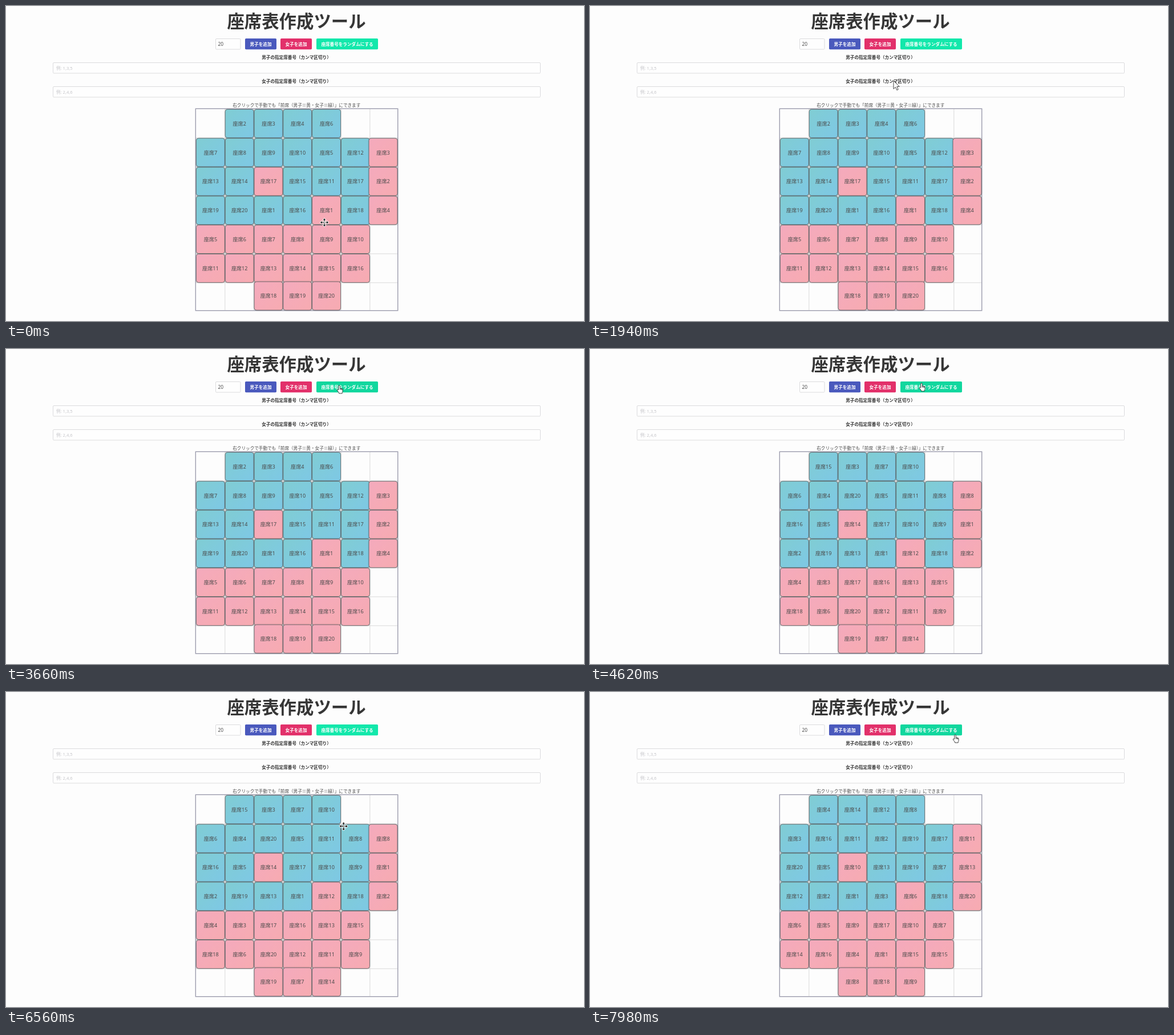
An HTML page that plays this animation: 1013x553 px, repeating every 8 s.

```html
<!DOCTYPE html>
<html lang="ja">
<head>
<meta charset="utf-8">
<title>座席表作成ツール</title>
<style>
html, body { margin: 0; width: 100%; height: 100%; overflow: hidden; background: #fdfdfd; }
svg { display: block; font-family: 'Noto Sans', 'Noto Sans CJK JP', sans-serif; }
text { fill: #4a4a4a; text-anchor: middle; white-space: pre; }
.bold { font-weight: 700; fill: #363636; }
.white { font-weight: 700; fill: #fff; }
.left { text-anchor: start; }
.hint { fill: #c6c6ca; }
.input { fill: #fefefe; stroke: #dbdbdd; }
.seat { stroke: #4b5456; stroke-width: .75; filter: drop-shadow(0 .6px .8px #0003); }
.line { stroke: #d9d9d9; fill: none; }
.cursor path { fill: #fff; stroke: #222; stroke-width: .85; stroke-linejoin: round; }
.cursor .dark { fill: #111; stroke: #fff; stroke-width: 1.8; paint-order: stroke; }
</style>
</head>
<body>
<svg width="1013" height="553" viewBox="0 0 1013 553">
  <defs>
    <linearGradient id="boy" x2="1" y2="1"><stop stop-color="#80cdd3"/><stop offset="1" stop-color="#7ec8e5"/></linearGradient>
    <linearGradient id="girl" x2="1" y2="1"><stop stop-color="#f4aabd"/><stop offset="1" stop-color="#f7abb1"/></linearGradient>
  </defs>
</svg>
<script>
const LOOP = 8000, CELL = 50.8, LEFT = 333, TOP = 181, SIZE = 353;
const svg = document.querySelector('svg');

function add(tag, attrs, text = '') {
  const el = document.createElementNS('http://www.w3.org/2000/svg', tag);
  for (const k in attrs) el.setAttribute(k, attrs[k]);
  el.textContent = text;
  return svg.appendChild(el);
}
const label = (x, y, text, cls = '', size = 7.6) =>
  add('text', { x, y, class: cls, 'font-size': size }, text);
const box = (x, y, width, height, attrs) => add('rect', { x, y, width, height, ...attrs });
const within = (v, from, size) => v >= from && v < from + size;

// Page header
label(509, 38, '座席表作成ツール', 'bold', 30.4);
box(367.5, 57.5, 43.5, 18.5, { class: 'input', rx: 1.5 });
label(371.5, 69.9, '20', 'left', 8.4);

const buttons = [
  [419, 55, '男子を追加', '#4a59bd'],
  [481, 55, '女子を追加', '#e2306a'],
  [544, 108, '座席番号をランダムにする', '#12e8ab']
].map(([x, w, text, fill]) => {
  const el = box(x, 57, w, 19.2, { rx: 1.8, fill });
  label(x + w / 2, 69.8, text, 'white');
  return { el, x, w };
});

const inputs = [[99, '男子', '1,3,5'], [141, '女子', '2,4,6']].map(([y, who, sample]) => {
  label(509, y - 6.1, who + 'の指定席番号（カンマ区切り）', 'bold');
  const el = box(82.5, y + .5, 854, 18.5, { class: 'input', rx: 1.5 });
  label(88, y + 12.7, '例: ' + sample, 'left hint');
  return { el, y };
});
label(509.3, 176.9, '右クリックで手動でも「前席（男子＝黄・女子＝緑）」にできます');

// Seating grid
let lines = '';
for (let i = 1; i < 7; i++)
  lines += `M${LEFT + i * CELL} ${TOP}v${SIZE}M${LEFT} ${TOP + i * CELL}h${SIZE}`;
add('path', { d: lines, class: 'line' });
box(LEFT - .7, TOP - .7, SIZE + 1.4, SIZE + 1.4, { fill: 'none', stroke: '#9c9cad', 'stroke-width': 1.4 });

const range = (from, to) => Array.from({ length: to - from + 1 }, (_, i) => from + i);
const boys = [...range(2, 4), ...range(6, 10), 5, ...range(12, 15), 11, 17, 19, 20, 1, 16, 18];
const girls = [3, 17, 2, 1, ...range(4, 16), ...range(18, 20)];
const plan = ['.bbbb..', 'bbbbbbg', 'bbgbbbg', 'bbbbgbg', 'gggggg.', 'gggggg.', '..ggg..'];

const seats = [];
plan.forEach((row, r) => [...row].forEach((kind, c) => {
  if (kind === '.') return;
  const isBoy = kind === 'b';
  const [x, y] = [LEFT + c * CELL, TOP + r * CELL]
    .map((v, i) => Math.min(v, [LEFT, TOP][i] + SIZE - CELL + .4));
  box(x + .4, y + .4, CELL - .8, CELL - .8, { rx: 4, class: 'seat', fill: `url(#${isBoy ? 'boy' : 'girl'})` });
  seats.push({ x, y, number: (isBoy ? boys : girls).shift(), text: label(x + 25.4, y + 28.8, '', '', 9.12) });
}));

function random(seed) {
  return () => (seed = seed * 16807 % 2147483647) / 2147483647;
}
function shuffle(list, seed) {
  const next = random(seed);
  return list.map(n => [next(), n]).sort((a, b) => a[0] - b[0]).map(pair => pair[1]);
}
const numbers = seats.map(s => s.number);
const boards = [
  { time: 0, numbers },
  { time: 3700, numbers: shuffle(numbers, 90210) },
  { time: 7720, numbers: shuffle(numbers, 48611) }
];

// Pointer shapes, each drawn around its hot spot
const shapes = {
  arrow: '<path d="M0 0V14.6L3.4 11.4L5.8 16.7L8.2 15.6L5.9 10.5H10.2Z"/>',
  hand: '<path d="M-1.3 8V1.3Q-1.3 0 0 0T1.3 1.3V4.8L5 5.7Q6 6 6 7V10.5Q6 11.5 5.2 12.5V14H-.5V12.8L-3.4 9Q-4 7.5 -3 7.1Q-2.2 7 -1.3 8ZM1.3 5V7.5M3 5.5V7.7M4.6 6V8"/>',
  move: [0, 90, 180, 270].map(a =>
    `<path class="dark" transform="rotate(${a})" d="M0 -7L2.4 -4.4H.6V.6H-.6V-4.4H-2.4Z"/>`).join(''),
  beam: '<path class="dark" d="M-2.5 -7.5H2.5V-6.5H.5V6.5H2.5V7.5H-2.5V6.5H-.5V-6.5H-2.5Z"/>'
};
const cursor = add('g', { class: 'cursor' });

// Pointer strokes: start, end, target x and y, downward sweep on the way
const strokes = [
  [0, 1, 558, 380, 0],
  [120, 860, 660, 212, 210],
  [960, 1000, 604, 355, 0],
  [1140, 1940, 532, 131, 170],
  [1960, 2540, 554, 50, 425],
  [2640, 2780, 576, 58, 0],
  [2780, 3200, 584, 64, 0],
  [4480, 4620, 581, 60, 0],
  [5160, 5900, 213, 331, 320],
  [6000, 6740, 657, 57, 310],
  [6840, 7020, 665.5, 96.5, 0],
  [7120, 7540, 625, 64, 305],
  [7680, 7980, 640, 75, 0]
];

function pointerAt(t) {
  const i = strokes.findLastIndex(s => s[0] <= t);
  const [start, end, x, y, sweep] = strokes[i];
  const [, , x0, y0] = strokes[Math.max(0, i - 1)];
  const u = Math.min(1, (t - start) / (end - start)), e = u * u * (3 - 2 * u);
  return [x0 + (x - x0) * e, y0 + (y - y0) * e + sweep * Math.sin(Math.PI * e)];
}

let shownBoard, shownShape;
function draw(t) {
  const [x, y] = pointerAt(t);
  const board = boards.findLast(b => b.time <= t);
  if (board !== shownBoard) {
    shownBoard = board;
    seats.forEach((s, i) => s.text.textContent = '座席' + board.numbers[i]);
  }

  let shape = 'arrow';
  if (seats.some(s => within(x, s.x, CELL) && within(y, s.y, CELL))) shape = 'move';
  for (const b of buttons) {
    const over = within(x, b.x, b.w) && within(y, 57, 19.2);
    if (over) shape = 'hand';
    b.el.style.filter = over ? 'brightness(.925)' : '';
  }
  for (const { el, y: top } of inputs) {
    const inside = within(x, 82, 855);
    if (inside && within(y, top, 19)) shape = 'beam';
    el.style.stroke = inside && within(y, top - 3, 23) ? '#bababa' : '';
  }
  if (shape !== shownShape) cursor.innerHTML = shapes[shownShape = shape];
  cursor.setAttribute('transform', `translate(${x} ${y})`);
}

const begin = performance.now();
function tick() {
  draw((performance.now() - begin) % LOOP);
  requestAnimationFrame(tick);
}
tick();
</script>
</body>
</html>
```
